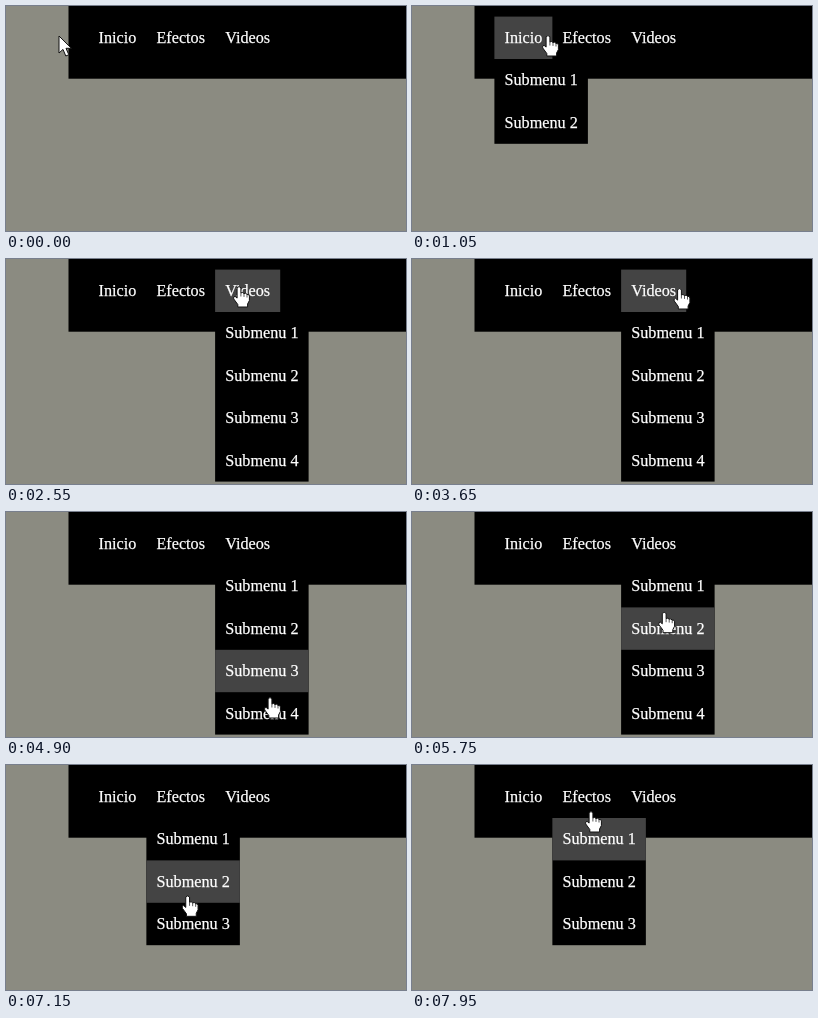
Animation, 400 px wide and 225 px high, one loop 8000 ms. Source, as an HTML page:

```html
<!DOCTYPE html>
<html lang="es">
<head>
<meta charset="utf-8">
<title>Menú desplegable</title>
<style>
  html, body { margin: 0; width: 100%; height: 100%; overflow: hidden; background: #8b8b81; }
  svg { display: block; width: 100vw; height: 100vh; }
  text {
    font: 16.2px "Liberation Serif", "Times New Roman", serif;
    fill: #fff; stroke: #fff; stroke-width: .25px;
  }
</style>
</head>
<body>
<svg viewBox="0 0 400 225">
  <rect x="62.5" y="-1" width="338" height="73.7"/>
  <g id="menus"></g>
  <g id="cursor" stroke="#111" stroke-linejoin="round" fill="#fff">
    <path id="arrow" d="M0 0V17L4 13.4L6.8 20L9.8 18.7L7 12.3H12.4Z"/>
    <g id="hand">
      <path d="M-1.9 1.2Q0-1 1.9 1.2V6.4Q3.6 5.3 5 7Q6.8 6 8 7.9Q10.2 7.3 10.4 9.6V14L8.6 17.5V20.5H-1.2V18L-5.3 12.4Q-6 10 -4 9.8L-1.9 11.6Z"/>
      <path d="M1.9 6.4V10M5 7V10.4M8 7.9V11" fill="none" stroke-width=".7"/>
    </g>
  </g>
</svg>
<script>
const LOOP = 8000, STEP = 50, HOVER_LAG = 100;
const LEFT = 82.4, TOP = 10.6, ROW = 42.4, PADDING = 10.1;

// Pointer stops; it glides evenly from one to the next.
const stops = [
  { arrive: 0, x: 53, y: 30 },
  { arrive: 1050, x: 136, y: 29.5 },
  { arrive: 2550, x: 233, y: 27.5 },
  { arrive: 3400, leave: 3550, x: 263, y: 29 },
  { arrive: 3650, leave: 3950, x: 267.5, y: 29.5 },
  { arrive: 4900, x: 264, y: 185.5 },
  { arrive: 5150, x: 263, y: 201 },
  { arrive: 6150, x: 245, y: 33 },
  { arrive: 6400, x: 191.5, y: 38 },
  { arrive: 7200, x: 181, y: 137 },
  { arrive: 7950, x: 179, y: 46.5 }
];

const byId = id => document.getElementById(id);
const show = (node, visible) => { node.style.display = visible ? '' : 'none'; };

function add(parent, tag, attrs = {}) {
  const node = document.createElementNS('http://www.w3.org/2000/svg', tag);
  for (const name in attrs) node.setAttribute(name, attrs[name]);
  return parent.appendChild(node);
}

function addItem(parent, label, x, row) {
  const y = TOP + row * ROW;
  const box = add(parent, 'rect', { x, y, height: ROW });
  const text = add(parent, 'text', { x: x + PADDING, y: y + 26.3 });
  text.textContent = label;
  const width = text.getComputedTextLength() + 2 * PADDING;
  box.setAttribute('width', width);
  return { box, width };
}

let nextX = LEFT;
const menus = ['Inicio', 'Efectos', 'Videos'].map((label, i) => {
  const x = nextX, count = i + 2;
  const items = [addItem(byId('menus'), label, x, 0)];
  const list = add(byId('menus'), 'g');
  const panel = add(list, 'rect', { x, y: TOP + ROW, height: count * ROW });
  for (let row = 1; row <= count; row++) items.push(addItem(list, 'Submenu ' + row, x, row));
  panel.setAttribute('width', items[1].width);
  nextX += items[0].width;
  return { x, items, list };
});

function pointerAt(time) {
  const i = Math.max(1, stops.findIndex(stop => stop.arrive >= time));
  const from = stops[i - 1], to = stops[i], leave = from.leave ?? from.arrive;
  const k = Math.max(0, (time - leave) / (to.arrive - leave));
  return { x: from.x + (to.x - from.x) * k, y: from.y + (to.y - from.y) * k };
}

// A submenu only responds while its menu is open, so hovering is replayed from the start.
function hoverAt(time) {
  let open, row;
  for (let t = 0; t <= time; t += STEP) {
    const { x, y } = pointerAt(t);
    row = Math.floor((y - TOP) / ROW);
    const hit = menu => menu?.items[row] && x >= menu.x && x < menu.x + menu.items[row].width;
    open = row === 0 ? menus.find(hit) : hit(open) ? open : undefined;
  }
  return { open, row };
}

function draw(time) {
  const { x, y } = pointerAt(time);
  const { open, row } = hoverAt(Math.max(0, time - HOVER_LAG));
  for (const menu of menus) {
    show(menu.list, menu === open);
    menu.items.forEach(({ box }, i) =>
      box.setAttribute('fill', menu === open && i === row ? '#444' : 'none'));
  }
  byId('cursor').setAttribute('transform', `translate(${x} ${y})`);
  show(byId('arrow'), !open);
  show(byId('hand'), open);
}

const start = performance.now();
function tick() {
  const time = (performance.now() - start) % LOOP;
  draw(Math.floor(time / STEP) * STEP);
  requestAnimationFrame(tick);
}
tick();
</script>
</body>
</html>
```
